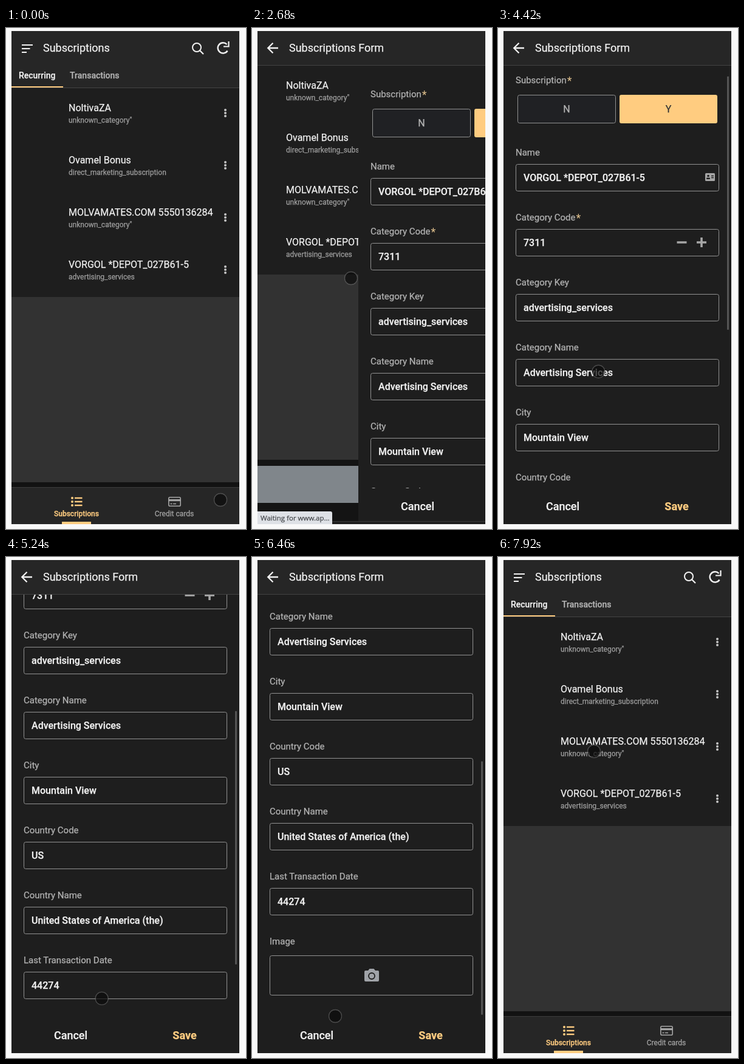
Write an HTML page that moves like this. It is 395 px wide and 825 px high and loops after 8000 ms.

```html
<!DOCTYPE html>
<html lang="en">
<head>
<meta charset="utf-8">
<title>Subscriptions</title>
<style>
html, body { margin: 0; width: 100%; height: 100%; overflow: hidden; background: #f9f9f9; }
svg { display: block; width: 395px; height: 825px; font-family: Roboto, sans-serif; }
text { white-space: pre; stroke-width: .25px; }
</style>
</head>
<body>
<svg id="stage" viewBox="0 0 395 825"></svg>
<script>
const LOOP = 8000, TICK = 20;
const ACCENT = '#ffcc80', PAGE = '#1e1e1e', BAR = '#262626', LIGHT = '#f2f2f2', MUTED = '#a6a6a6';
const TAB_H = 37, WIDTH = 375, PARALLAX = 0.225;
const ROW_H = 86, FIELD_H = 107;

const rect = (x, y, w, h, fill, more = '') =>
  `<rect x="${x}" y="${y}" width="${w}" height="${h}" fill="${fill}" ${more}/>`;
const text = (x, y, size, fill, str, weight = 400, more = '') =>
  `<text x="${x}" y="${y}" font-size="${size}" fill="${fill}" stroke="${fill}" font-weight="${weight}" ${more}>${str}</text>`;
const centred = (x, y, size, fill, str, weight) => text(x, y, size, fill, str, weight, 'text-anchor="middle"');
const line = (d, color, width = 2) =>
  `<path d="${d}" fill="none" stroke="${color}" stroke-width="${width}"/>`;
const dot = (x, y, r, fill) => `<circle cx="${x}" cy="${y}" r="${r}" fill="${fill}"/>`;
const group = (id, body, more = '') => `<g id="${id}" ${more}>${body}</g>`;
const clip = (id, y, h) => `<clipPath id="${id}">${rect(9, y, WIDTH, h, '#000')}</clipPath>`;
const outline = (x, y, w, h, fill = 'none') =>
  rect(x + .5, y + .5, w - 1, h - 1, fill, 'rx="3" stroke="#929292"');

const merchant = 'VORGOL *DEPOT_027B61-5';
const rows = [
  ['NoltivaZA', 'unknown_category"'],
  ['Ovamel Bonus', 'direct_marketing_subscription'],
  ['MOLVAMATES.COM 5550136284', 'unknown_category"'],
  [merchant, 'advertising_services']
];
const fields = [
  ['Name', merchant],
  ['Category Code', '7311', true],
  ['Category Key', 'advertising_services'],
  ['Category Name', 'Advertising Services'],
  ['City', 'Mountain View'],
  ['Country Code', 'US'],
  ['Country Name', 'United States of America (the)'],
  ['Last Transaction Date', '44274']
];

function listPage() {
  const items = rows.map(([name, kind], i) => {
    const y = ROW_H * i;
    return text(103, 137 + y, 16, LIGHT, name) + text(103, 156 + y, 12, '#a0a0a0', kind) +
      [135, 140, 145].map(c => dot(361, c + y, 2, '#c4c4c4')).join('');
  }).join('');
  return rect(9, 62, 500, 800, '#141414') + rect(9, 62, 500, 381, PAGE) +
    rect(9, 443, 500, 305, '#323232') +
    group('press', rect(9, 357, WIDTH, ROW_H, '#fff')) + items;
}

function navBar() {
  const bullets = [774, 780, 786].map(y =>
    dot(109, y, 2, ACCENT) + line(`M113 ${y}H125.500`, ACCENT, 2.4)).join('');
  return rect(9, 748, WIDTH, 8, '#121212') + rect(9, 756, WIDTH, 1, '#3c3c3c') +
    rect(9, 757, WIDTH, 60, BAR) + bullets +
    centred(116, 804, 12, ACCENT, 'Subscriptions', 500) + rect(92, 813, 48, 4, ACCENT) +
    rect(267.8, 772.8, 19.4, 14.4, 'none', `rx="2" stroke="${MUTED}" stroke-width="1.6"`) +
    rect(268, 776, 19, 3.2, MUTED) + line('M270.500 783.500h3m1.500 0h5', MUTED, 1.6) +
    centred(277, 804, 12, MUTED, 'Credit cards');
}

function tabBar() {
  return rect(9, 62, WIDTH, TAB_H, BAR) + rect(9, 98, WIDTH, 1, '#444') +
    text(21, 83, 14, LIGHT, 'Recurring', 500) +
    text(105, 83, 14, '#b4b4b4', 'Transactions', 500) + rect(9, 96, 85, 2, ACCENT);
}

function listHead() {
  return line('M26 28H44M26 34H39.500M26 40H34', LIGHT, 2.2) +
    text(61, 39, 18, LIGHT, 'Subscriptions') +
    `<circle cx="314" cy="32" r="7" fill="none" stroke="${LIGHT}" stroke-width="2"/>` +
    line('M319 37L325 43', LIGHT, 2.2) +
    line('M363.500 27A8.600 8.600 0 1 0 364.500 37.500', LIGHT, 2.4) +
    line('M366.500 22V30.500H358', LIGHT, 2.2);
}

function formHead() {
  return line('M43 33H27M34.500 24.800L26.300 33L34.500 41.200', LIGHT, 2.3) +
    text(61, 39, 18, LIGHT, 'Subscriptions Form') + rect(9, 61, WIDTH, 1, '#434343');
}

function formIcons() {
  const card = rect(341, 262, 16, 13, MUTED, 'rx="1.5"') + dot(346, 266.5, 1.8, PAGE) +
    rect(343, 269.5, 6, 2.5, PAGE, 'rx="1"') + line('M351 266.500h4m-4 3h4', PAGE, 1.3);
  const stepper = line('M294.500 376h16M327 376h16M335 368v16', MUTED, 3.6);
  const camera =
    `<path d="M187 1132h4l2.500-3h7l2.500 3h4q2 0 2 2v14q0 2-2 2h-20q-2 0-2-2v-14q0-2 2-2z" fill="#a0a3a8"/>` +
    `<circle cx="197" cy="1141" r="5" fill="#a0a3a8" stroke="${PAGE}" stroke-width="1.8"/>`;
  return card + stepper + camera;
}

function formBody() {
  const star = `<tspan font-size="18" dx="1" dy="1.5" fill="#e0c08c" stroke="none">*</tspan>`;
  const label = (y, str, must) => text(29, y, 15, '#b4b4b4', str + (must ? star : ''));
  const inputs = fields.map(([name, value, must], i) => {
    const y = FIELD_H * i;
    return label(233 + y, name, must) + outline(29, 247 + y, 335, 45) +
      text(42, 275 + y, 16, LIGHT, value, 500);
  }).join('');
  return label(114, 'Subscription', true) +
    outline(32, 133, 162, 47, '#202124') + rect(200, 133, 161, 47, ACCENT, 'rx="3"') +
    centred(113, 162, 16, '#b4b4b4', 'N') + centred(280.5, 162, 16, '#333', 'Y') +
    inputs + label(1089, 'Image') + outline(29, 1107, 335, 66) + formIcons();
}

function formPage() {
  return rect(9, 62, WIDTH, 755, PAGE) +
    `<g clip-path="url(#view)">${group('scroll', formBody())}</g>` +
    rect(377, 0, 3, 417, '#555', 'id="thumb"') +
    centred(106.5, 794, 18, LIGHT, 'Cancel', 500) + centred(294, 794, 18, ACCENT, 'Save', 700);
}

const svg = document.getElementById('stage');
svg.innerHTML =
  `<defs>${clip('phone', 5, 812)}${clip('view', 62, 696)}</defs>` +
  rect(0, 0, 395, 825, '#f9f9f9') +
  `<g clip-path="url(#phone)">` + rect(9, 5, WIDTH, 812, PAGE) +
  group('list', listPage()) + group('nav', navBar()) +
  group('shade', rect(9, 721, WIDTH, 61, '#80868b')) + group('form', formPage()) +
  group('edge', rect(9, 812, WIDTH, 5, PAGE) + rect(9, 812, WIDTH, 1, '#3a3a3a')) +
  rect(9, 5, WIDTH, 57, BAR) + group('tabs', tabBar()) +
  group('listHead', listHead()) + group('formHead', formHead()) +
  group('status', `<path d="M9 796H129q3 0 3 3V817H9z" fill="#dee1e6"/>` +
    text(14, 811, 11.5, '#45484c', 'Waiting for www.ap...', 400, `font-family="'Open Sans', sans-serif"`)) +
  `</g>` +
  `<circle id="touch" r="10.500" fill="#0a0a0a" fill-opacity=".7" stroke="#8a8a8a" stroke-opacity=".45" stroke-width="1.300"/>`;

const el = {};
svg.querySelectorAll('[id]').forEach(n => el[n.id] = n);

// Resting points of the finger: time, x, y
const stops = [
  [70, 353, 777], [740, 154, 98], [1040, 157, 139], [1280, 157, 139], [2070, 165, 395],
  [2680, 163, 412], [3780, 166, 600], [4320, 166, 600], [4700, 162, 400], [5400, 157, 777],
  [5900, 160, 510], [6300, 149, 792], [6460, 137, 756], [6800, 116, 789], [7360, 116, 789],
  [7900, 158, 320]
];

const part = (t, a, b) => Math.min(1, Math.max(0, (t - a) / (b - a)));
const smooth = (t, a, b) => { const p = part(t, a, b); return p * p * (3 - 2 * p); };
const easeOut = (t, a, b) => 1 - Math.pow(1 - part(t, a, b), 1.5);
const show = (name, on) => el[name].setAttribute('display', on ? 'inline' : 'none');
const fade = (name, v) => el[name].setAttribute('opacity', v);
const move = (name, x, y) => el[name].setAttribute('transform', `translate(${x} ${y})`);

function finger(t) {
  let [, x, y] = stops[0];
  for (let i = 1; i < stops.length; i++) {
    const k = smooth(t, stops[i - 1][0], stops[i][0]);
    x += (stops[i][1] - stops[i - 1][1]) * k;
    y += (stops[i][2] - stops[i - 1][2]) * k;
  }
  return [x, y];
}

function draw(t) {
  const open = easeOut(t, 2500, 2930) - easeOut(t, 7370, 7760);
  const inForm = t >= 2500 && t < 7370;
  const away = open > 0, sliding = away && open < 1;
  const scroll = Math.round(313 * smooth(t, 4340, 4820) + 138 * smooth(t, 5540, 6020));

  move('list', Math.round(-WIDTH * open * PARALLAX), away ? -TAB_H : 0);
  move('form', Math.round(WIDTH * (1 - open)), 0);
  move('scroll', 0, -scroll);
  el.thumb.setAttribute('y', 66 + .6 * scroll);
  fade('thumb', smooth(t, 3100, 3250) - smooth(t, 6600, 6900));
  fade('press', .07 * (smooth(t, 2140, 2240) - smooth(t, 2400, 2500)));
  show('form', away);
  show('nav', !away);
  show('tabs', !away);
  show('shade', sliding);
  show('edge', sliding);
  show('listHead', !inForm);
  show('formHead', inForm);
  show('status', t >= 2450 && t < 3300);
  move('touch', ...finger(t));
}

const start = performance.now();
function tick() {
  const t = (performance.now() - start) % LOOP;
  draw(Math.floor(t / TICK) * TICK);
  requestAnimationFrame(tick);
}
tick();
</script>
</body>
</html>
```
